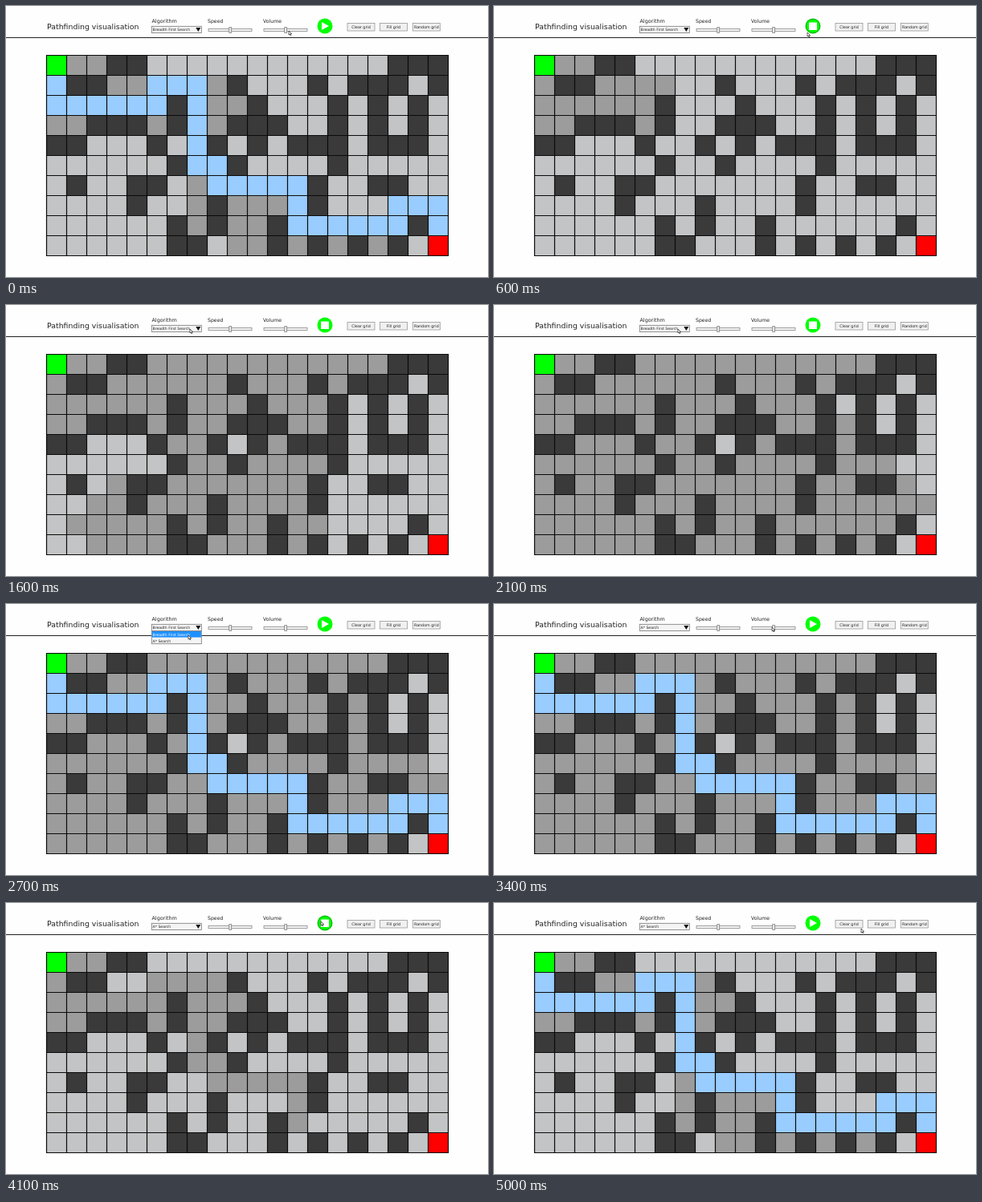
An HTML page with a canvas that plays this animation: 600 px wide and 338 px high, repeating every 5.1 s.

```html
<!DOCTYPE html>
<html lang="en">
<head>
<meta charset="utf-8">
<title>Pathfinding visualisation</title>
<style>
html, body { margin: 0; width: 100%; height: 100%; overflow: hidden; background: #fefefe; }
canvas { display: block; }
</style>
</head>
<body>
<canvas id="stage" width="600" height="338"></canvas>
<script>
const ctx = document.getElementById('stage').getContext('2d');
const LOOP = 5100, STEP = 100, RATE = 0.072;
const BFS_START = 375, ASTAR_START = 3657;
const COLS = 20, ROWS = 10, CELL = 25, LEFT = 50.5, TOP = 61.5;

const maze = [
  '...##............###',
  '.##......#...#.###.#',
  '......#...#...#.#.#.',
  '..###.#..###..#.#.#.',
  '##...#..#.#.###.###.',
  '......#..#....#.....',
  '.#..##.......#..##..',
  '....#...#....#......',
  '......#.#..#......#.',
  '......##...#.#.#.#..'
];
const goal = COLS * ROWS - 1;
const isWall = i => maze[Math.floor(i / COLS)][i % COLS] === '#';
const distance = i => COLS - 1 - i % COLS + ROWS - 1 - Math.floor(i / COLS);

function neighbours(i) {
  const x = i % COLS, y = Math.floor(i / COLS);
  return [[1, 0], [0, 1], [-1, 0], [0, -1]]
    .map(([dx, dy]) => [x + dx, y + dy])
    .filter(([c, r]) => c >= 0 && c < COLS && r >= 0 && r < ROWS)
    .map(([c, r]) => r * COLS + c)
    .filter(n => !isWall(n));
}

// Best-first search; a zero heuristic makes it breadth first.
function search(heuristic) {
  const cost = { 0: 0 }, parent = {}, done = new Set(), order = [], path = [];
  const open = [{ i: 0, f: heuristic(0), h: heuristic(0) }];
  while (open.length) {
    open.sort((a, b) => a.f - b.f || a.h - b.h);
    const { i } = open.shift();
    if (done.has(i)) continue;
    done.add(i);
    if (i) order.push(i);
    if (i === goal) break;
    for (const n of neighbours(i)) {
      const g = cost[i] + 1;
      if (n in cost && cost[n] <= g) continue;
      cost[n] = g;
      parent[n] = i;
      open.push({ i: n, f: g + heuristic(n), h: heuristic(n) });
    }
  }
  for (let i = parent[goal]; i; i = parent[i]) path.unshift(i);
  return { order, path };
}
const breadth = search(() => 0);
const star = search(distance);

// time, x, y
const pointer = [
  [0, 352, 31], [300, 391, 27], [400, 391, 27], [600, 390, 33], [900, 390, 33],
  [1500, 229, 30], [2400, 229, 30], [2700, 227, 39], [3000, 215, 46],
  [3200, 215, 46], [3500, 392, 23], [4400, 392, 23], [5000, 457, 32]
];
function pointerAt(t) {
  const k = Math.min(pointer.findLastIndex(p => p[0] <= t), pointer.length - 2);
  const [t0, x0, y0] = pointer[k], [t1, x1, y1] = pointer[k + 1];
  const p = Math.min(1, (t - t0) / (t1 - t0));
  const e = p * p * (3 - 2 * p);
  return [x0 + (x1 - x0) * e, y0 + (y1 - y0) * e];
}

function box(x, y, w, h, fill, stroke) {
  ctx.fillStyle = fill;
  ctx.fillRect(x, y, w, h);
  if (!stroke) return;
  ctx.strokeStyle = stroke;
  ctx.lineWidth = 0.8;
  ctx.strokeRect(x, y, w, h);
}
function text(str, x, y, size, color = '#222', align = 'left') {
  ctx.font = `${size}px "DejaVu Sans", sans-serif`;
  ctx.textAlign = align;
  ctx.fillStyle = color;
  ctx.fillText(str, x, y);
}
function shape(points, fill, stroke) {
  ctx.beginPath();
  points.forEach(([x, y]) => ctx.lineTo(x, y));
  ctx.closePath();
  ctx.fillStyle = fill;
  ctx.fill();
  if (!stroke) return;
  ctx.strokeStyle = stroke;
  ctx.lineWidth = 0.7;
  ctx.stroke();
}
function slider(label, x) {
  text(label, x - 1, 21, 6.2);
  box(x, 28.5, 54, 3, '#f4f4f4', '#888');
  box(x + 25.7, 26.7, 3, 6.6, '#eee', '#777');
}
function button(label, x) {
  box(x, 21.5, 34, 9.5, '#f0f0f0', '#999');
  text(label, x + 17, 28, 4.8, '#222', 'center');
}

function drawPlayButton(running, hover) {
  ctx.beginPath();
  ctx.arc(397, 25, 9.5, 0, Math.PI * 2);
  ctx.fillStyle = '#0f0';
  ctx.fill();
  if (hover) {
    ctx.beginPath();
    ctx.arc(397, 25, 8.8, 0, Math.PI * 2);
    ctx.strokeStyle = '#357a35';
    ctx.lineWidth = 0.7;
    ctx.stroke();
  }
  if (running) box(392, 20.5, 10, 9.5, '#fff');
  else shape([[393, 20], [393, 30], [402, 25]], '#fff');
}

function drawHeader(t, running, [mx, my]) {
  text('Pathfinding visualisation', 51, 29, 9.4);
  text('Algorithm', 181.5, 21, 6.4);
  slider('Speed', 252);
  slider('Volume', 321);
  drawPlayButton(running, Math.abs(mx - 397) < 10 && my < 35);
  button('Clear grid', 425);
  button('Fill grid', 465.5);
  button('Random grid', 506.3);
  box(0, 39, 600, 1, '#222');

  const names = ['Breadth First Search', 'A* Search'];
  box(181.3, 25.3, 62, 8.2, '#f4f4f4', '#777');
  text(names[t >= 3200 ? 1 : 0], 182.5, 31.2, 4.6);
  shape([[236.3, 27], [242.3, 27], [239.3, 32]], '#111');
  if (t >= 2300 && t < 3200) {
    const active = my < 42 ? 0 : 1;
    box(181.3, 33.7, 62, 16, '#f4f4f4', '#777');
    names.forEach((name, k) => {
      if (k === active) box(181.7, 34 + k * 8, 61.2, 7.6, '#1e90ff');
      text(name, 182.5, 39.5 + k * 8, 4.6, k === active ? '#fff' : '#222');
    });
  }
}

function drawGrid(run, n) {
  const colors = Array.from({ length: COLS * ROWS }, (_, i) => isWall(i) ? '#3a3a3a' : '#c3c4c5');
  run.order.slice(0, n).forEach(i => colors[i] = '#9c9c9c');
  run.path.slice(0, Math.max(0, n - run.order.length)).forEach(i => colors[i] = '#99ccff');
  colors[0] = '#0f0';
  colors[goal] = '#f00';
  ctx.strokeStyle = '#0a0a0a';
  ctx.lineWidth = 1.2;
  colors.forEach((color, i) => {
    const x = LEFT + i % COLS * CELL, y = TOP + Math.floor(i / COLS) * CELL;
    ctx.fillStyle = color;
    ctx.fillRect(x, y, CELL, CELL);
  });
  ctx.beginPath();
  for (let c = 0; c <= COLS; c++) {
    ctx.moveTo(LEFT + c * CELL, TOP - 0.5);
    ctx.lineTo(LEFT + c * CELL, TOP + ROWS * CELL + 0.5);
  }
  for (let r = 0; r <= ROWS; r++) {
    ctx.moveTo(LEFT - 0.5, TOP + r * CELL);
    ctx.lineTo(LEFT + COLS * CELL + 0.5, TOP + r * CELL);
  }
  ctx.stroke();
}

function drawPointer([x, y]) {
  const outline = [[0, 0], [0, 5], [1.2, 4], [2, 5.8], [2.8, 5.4], [2.1, 3.7], [3.7, 3.6]];
  shape(outline.map(([dx, dy]) => [x + dx, y + dy]), '#fff', '#222');
}

function frame(now) {
  const t = Math.floor(now % LOOP / STEP) * STEP;
  const useBreadth = t >= BFS_START && t < ASTAR_START;
  const run = useBreadth ? breadth : star;
  const start = useBreadth ? BFS_START : t < BFS_START ? ASTAR_START - LOOP : ASTAR_START;
  const n = Math.floor((t - start) * RATE);
  const running = n < run.order.length + run.path.length;
  const mouse = pointerAt(t);
  box(0, 0, 600, 338, '#fefefe');
  drawGrid(run, n);
  drawHeader(t, running, mouse);
  drawPointer(mouse);
}

const origin = performance.now();
function tick() {
  frame(performance.now() - origin);
  requestAnimationFrame(tick);
}
tick();
</script>
</body>
</html>
```
